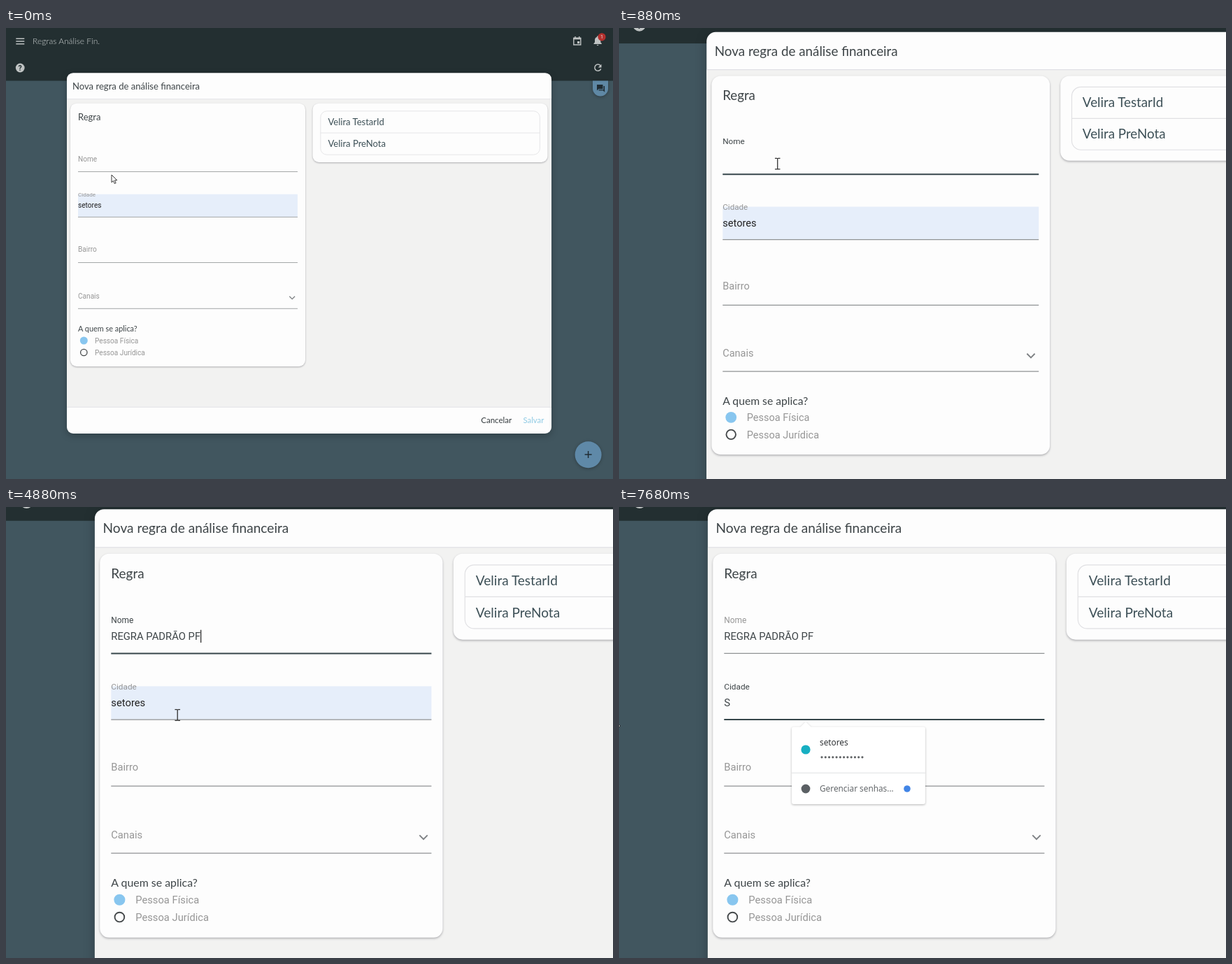
An HTML page that plays this animation: 868 by 645 pixels, repeating every 8 s.

```html
<!DOCTYPE html>
<html lang="pt-BR">
<head>
<meta charset="utf-8">
<title>Nova regra</title>
<style>
  html, body { margin: 0; width: 100%; height: 100%; overflow: hidden; background: #41565f; }
  svg { display: block; width: 868px; height: 645px; }
  text { white-space: pre; }
  .g { font-family: Lato, "Open Sans", sans-serif; }
  .r { font-family: Roboto, Arial, sans-serif; }
  .n { font-family: "Noto Sans", "Open Sans", sans-serif; }
  .card { fill: #fdfdfd; filter: drop-shadow(0 1px 1.2px rgba(50, 50, 60, .36)); }
  .modal { filter: drop-shadow(0 3px 5px rgba(0, 0, 0, .25)); }
  .pop { fill: #fff; filter: drop-shadow(0 1px 1.5px rgba(0, 0, 0, .28)); }
</style>
</head>
<body>
<svg id="stage" viewBox="0 0 868 645" xmlns="http://www.w3.org/2000/svg"></svg>
<script>
const LOOP = 8000, STEP = 40;
const NAME = "REGRA PADRÃO PF", CITY = "setores", HOST = "tramavedom";
const KEYS = [960, 1000, 1120, 1200, 1280, 1680, 2280, 2600, 2720, 2840, 3080, 3360, 3720, 3880, 4000];
const CARET_OFF = [[720, 960], [1480, 1680], [2120, 2280], [5960, 6360], [7160, 8000]];
const FOCUS_NAME = 240, FOCUS_CITY = 4960, POPUP = 5080, CLEAR = 5480, TYPE_CITY = 6680;
const ZOOM = { start: 568, length: 400, scale: 1.459, y: 197 };
const DARK = "#3d4447", GREY = "#969696", LINE = "#8f9294";

const label = (x, y, size, str, fill = DARK, cls = "g", extra = "") =>
  `<text class="${cls}" x="${x}" y="${y}" font-size="${size}" fill="${fill}" ${extra}>${str}</text>`;
const box = (x, y, w, h, r, fill, extra = "") =>
  `<rect x="${x}" y="${y}" width="${w}" height="${h}" rx="${r}" fill="${fill}" ${extra}/>`;
const dot = (x, y, r, fill, extra = "") =>
  `<circle cx="${x}" cy="${y}" r="${r}" fill="${fill}" ${extra}/>`;
const path = (d, stroke, w, extra = "") =>
  `<path d="${d}" fill="none" stroke="${stroke}" stroke-width="${w}" ${extra}/>`;
const underline = (y, id = "") => path(`M103 ${y}H417`, LINE, .8, id);

function header() {
  const ink = "#bfc3c3";
  return box(0, 0, 868, 75.5, 0, "#232f31") +
    path("M14.3 15.2h12M14.3 19h12M14.3 22.8h12", ink, 1.5) +
    label(38, 23, 12, "Regras Análise Fin.", "#cdd2d2", "g", 'font-weight="300"') +
    path("M811.8 14.5h10v9.5h-10zM814 12v2M819.7 12v2", ink, 1.4) +
    path("M811.5 15h10.6", ink, 2.6) + box(817, 19, 3.2, 3.2, 0, ink) +
    `<path d="M840.5 23v-1l1.5-1.5v-3.6q.3-3.3 3-4v-.9q1.2-1.4 2.3 0v.9q2.7.7 3 4v3.6l1.5 1.5v1zM844.6 24h3q-1.5 2.6-3 0z" fill="${ink}"/>` +
    dot(852, 12.8, 5.6, "#b3302d") +
    label(852, 15.4, 7, "1", "#eee", "r", 'text-anchor="middle"') +
    dot(20.2, 57, 6.4, ink) +
    label(20.2, 60.8, 10.5, "?", "#232f31", "r", 'text-anchor="middle" font-weight="700"') +
    path("M850 53.8a4.6 4.6 0 1 0 .7 4.6", ink, 1.5) +
    `<path d="M851.5 51.8v4.8h-4.8z" fill="${ink}"/>`;
}

function sideButtons() {
  return `<g style="filter:drop-shadow(0 1px 2px rgba(0,0,0,.3))">
    <path d="M839 75.5h22v11a11 11 0 0 1-22 0z" fill="#5f88a5"/>${dot(832.6, 610.2, 19, "#5f89a8")}</g>
    <path d="M845 81h8.5v6.3h-6.3l-2.2 2.2zM854.5 83h1.6v8.7l-2.2-2.2h-6.4v-1.3h7z" fill="#202c33"/>` +
    path("M827.6 610h10M832.6 605v10", "#202c33", 1.5);
}

function modal() {
  return box(87, 64.2, 693, 515.8, 9, "#fdfdfd", 'class="modal"') +
    box(87, 102, 693, 440, 0, "#f2f2f1") +
    path("M87 101.6H780M87 542.3H780", "#dfdfe4", .8) +
    label(95, 87.6, 13.08, "Nova regra de análise financeira") +
    label(679.3, 564.8, 11.5, "Cancelar", "#333a3d") +
    label(739.5, 564.8, 11.3, "Salvar", "#8ecae4") +
    box(92, 107.7, 336, 376.3, 9, "#fdfdfd", 'class="card"') +
    box(438.5, 107.7, 336, 84.3, 9, "#fdfdfd", 'class="card"') +
    box(449.8, 118.8, 313.6, 62.4, 9, "none", 'stroke="#e0e0e3" stroke-width=".8"') +
    path("M449.8 150H763.4", "#e0e0e3", .8) +
    label(460.5, 138.8, 13.05, "Velira TestarId", "#3d5057") +
    label(460.5, 170, 13.05, "Velira PreNota", "#3d5057") +
    label(103, 132, 13, "Regra");
}

function form() {
  return `<text id="nameLabel" class="r" x="103">Nome</text>` + underline(205.5, 'id="nameLine"') +
    label(103, 192, 10.15, "", DARK, "r", 'id="nameText"') +
    box(103, 237.7, 314, 32.5, 0, "#e6eefa", 'id="fill"') +
    label(103, 240.9, 8.1, "Cidade", GREY, "r", 'id="cityLabel"') +
    underline(270.4, 'id="cityLine"') +
    box(103, 247.6, 34, 12.6, 0, "#2f82ee", 'id="select"') +
    label(103, 257.4, 10.15, "", DARK, "r", 'id="cityText"') +
    label(103, 320.2, 10.1, "Bairro", GREY, "r") + underline(335.5) +
    label(103, 386.8, 10.1, "Canais", GREY, "r") + underline(401.3) +
    path("M405.3 383.7l3.9 3.9 3.9-3.9", "#7d8083", 1.3) +
    label(103, 434.4, 10.9, "A quem se aplica?") +
    dot(111.3, 447, 5.5, "#88c6ef") +
    dot(111.3, 464, 4.7, "none", 'stroke="#44484a" stroke-width="1.3"') +
    label(127, 450.6, 10.1, "Pessoa Física", GREY, "r") +
    label(127, 467.6, 10.1, "Pessoa Jurídica", GREY, "r") +
    path("", "#333", .9, 'id="caret"');
}

function popup(id, width, foot, rows) {
  const right = 247 + width;
  const items = rows.map(([user, dots, site, x], i) => {
    const y = 347 + i * 57.4;
    return dot(267, y, 6.6, "#17afc2") +
      label(287, y - 6.3, 11.8, user, "#303336", "n") +
      (site ? label(x, y - 6.3, 11.8, site, "#6b6f72", "n") : "") +
      path(`M290 ${y + 10.8}h${(dots - 1) * 5.27 + .1}`, "#5f6264", 3.2,
        'stroke-linecap="round" stroke-dasharray="0 5.27"');
  }).join("");
  return `<g id="${id}"><g class="pop"><path d="M259 315l8-8 8 8z"/>${box(247, 314.5, width, foot - 269.5, 3, "#fff")}</g>` +
    items + path(`M247 ${foot + .3}H${right}`, "#dfe1e3", 1) +
    dot(267, foot + 23, 6.4, "#5b6064") +
    label(287, foot + 27.2, 11.8, "Gerenciar senhas...", "#63676a", "n") +
    dot(right - 26, foot + 23, 4.8, "#4285e6") + `</g>`;
}

const stage = document.getElementById("stage");
const first = [CITY, 12];
stage.innerHTML = box(0, 0, 868, 645, 0, "#41565f") +
  `<g id="scene">${header()}${sideButtons()}${modal()}${form()}</g>` +
  popup("popFull", 393, 552, [
    first,
    [HOST, 16, `tests.${HOST}.com.br`, 379],
    [HOST + "ltda", 8, `vendas.${HOST}.com.br`, 387],
    [`mendo@${HOST}.com.br`, 10, `pgadmin.${HOST}.com.br`, 457],
  ]) +
  popup("popOne", 191, 380, [first]) +
  `<g id="pointer"><g id="ring">
    <circle id="halo" fill="none" stroke="#f0c46a" stroke-width="1"/>
    <circle id="hoop" fill="none" stroke="#f0ac38"/>
    <circle id="core" r="2.2" fill="#f5cf6c"/></g>
    <path id="arrow" d="M0 0v10.8l2.5-2.3 1.7 4 1.9-.8-1.7-3.9h3.4z" fill="#fff" stroke="#222" stroke-width=".9"/>
    <path id="beam" d="M-2.6-5.4h1.8q.8 0 .8.8v9.2q0 .8-.8.8h-1.8M2.6-5.4h-1.8q-.8 0-.8.8v9.2q0 .8.8.8h1.8" fill="none" stroke="#333" stroke-width=".9"/></g>
  <path id="edge" d="M-2 310l4 3-4 3.5" fill="#fff" stroke="#222"/>`;

const el = {};
stage.querySelectorAll("[id]").forEach(e => el[e.id] = e);
const set = (id, attrs) => { for (const k in attrs) el[id].setAttribute(k, attrs[k]); };
const show = (id, on) => set(id, { visibility: on ? "visible" : "hidden" });
const clamp = v => Math.max(0, Math.min(1, v));
const mix = (a, b, p) => a + (b - a) * p;
const ease = p => p < .5 ? 4 * p ** 3 : 1 - (2 - 2 * p) ** 3 / 2;
const smooth = p => p * p * (3 - 2 * p);

const MOVES = [
  [0, 151, 210], [240, 155.3, 194], [480, 157.5, 195], [4440, 157.5, 195], [4920, 168.3, 267.3], [LOOP, 168.3, 267.3],
];
function mouseAt(t) {
  const i = MOVES.findIndex(m => m[0] > t);
  const [t0, x0, y0] = MOVES[i - 1], [t1, x1, y1] = MOVES[i];
  const p = smooth((t - t0) / (t1 - t0));
  return [mix(x0, x1, p), mix(y0, y1, p)];
}

function drawRing(t) {
  const [start, x, y] = t < 3000 ? [240, 155.3, 194] : [4960, 168.3, 267.3];
  const p = (t - start) / 640;
  show("ring", p > 0 && p < 1);
  if (p <= 0 || p >= 1) return;
  const r = 1 + 21.4 * p, alpha = Math.min(.95, 2.1 * (1 - p));
  set("ring", { transform: `translate(${x} ${y})` });
  set("hoop", { r, "stroke-width": mix(6.5, 2.4, p), opacity: alpha });
  set("halo", { r: r + 4, opacity: clamp(2 * (alpha - .66)) });
  set("core", { opacity: clamp(alpha - .15) });
}

function drawFields(t) {
  const onName = t >= FOCUS_NAME && t < FOCUS_CITY, onCity = t >= FOCUS_CITY;
  const lift = smooth(clamp((t - FOCUS_NAME) / 200));
  const focusLine = on => ({ stroke: on ? "#36464b" : LINE, "stroke-width": on ? 1.4 : .8 });
  set("nameLabel", { y: mix(190.6, 175.8, lift), "font-size": mix(10.1, 8.15, lift), fill: onName ? DARK : GREY });
  set("nameLine", focusLine(onName));
  set("cityLabel", { fill: onCity ? DARK : GREY });
  set("cityLine", focusLine(onCity));

  const cleared = t >= CLEAR, selected = onCity && !cleared;
  el.nameText.textContent = NAME.slice(0, KEYS.filter(k => k <= t).length);
  el.cityText.textContent = !cleared ? CITY : t >= TYPE_CITY ? "S" : "";
  set("cityText", { fill: selected ? "#fff" : cleared ? DARK : "#222" });
  show("fill", !cleared);
  show("select", selected);
  if (selected) set("select", { width: el.cityText.getComputedTextLength() + .3 });

  const blink = !CARET_OFF.some(([a, b]) => t >= a && t < b);
  show("caret", blink && (onName || cleared));
  const field = onCity ? el.cityText : el.nameText;
  const x = 103.4 + (field.textContent ? field.getComputedTextLength() : 0);
  set("caret", { d: `M${x} ${onCity ? 247.3 : 182.4}v12.6` });
}

function draw(t) {
  const s = mix(1, ZOOM.scale, ease(clamp((t - ZOOM.start) / ZOOM.length)));
  const transform = `translate(0 ${ZOOM.y * (1 - s)}) scale(${s})`;
  set("scene", { transform });
  set("pointer", { transform });
  drawFields(t);
  drawRing(t);

  const [x, y] = mouseAt(t), inField = y < 206 || y > 238, away = t >= POPUP;
  set("arrow", { transform: `translate(${x} ${y})` });
  set("beam", { transform: `translate(${x} ${y})` });
  show("arrow", !inField && !away);
  show("beam", inField && !away);
  show("edge", away);
  show("popFull", away && t < TYPE_CITY);
  show("popOne", t >= TYPE_CITY);
}

const begin = performance.now();
function tick() {
  const t = (performance.now() - begin) % LOOP;
  draw(Math.floor(t / STEP) * STEP);
  requestAnimationFrame(tick);
}
tick();
</script>
</body>
</html>
```
